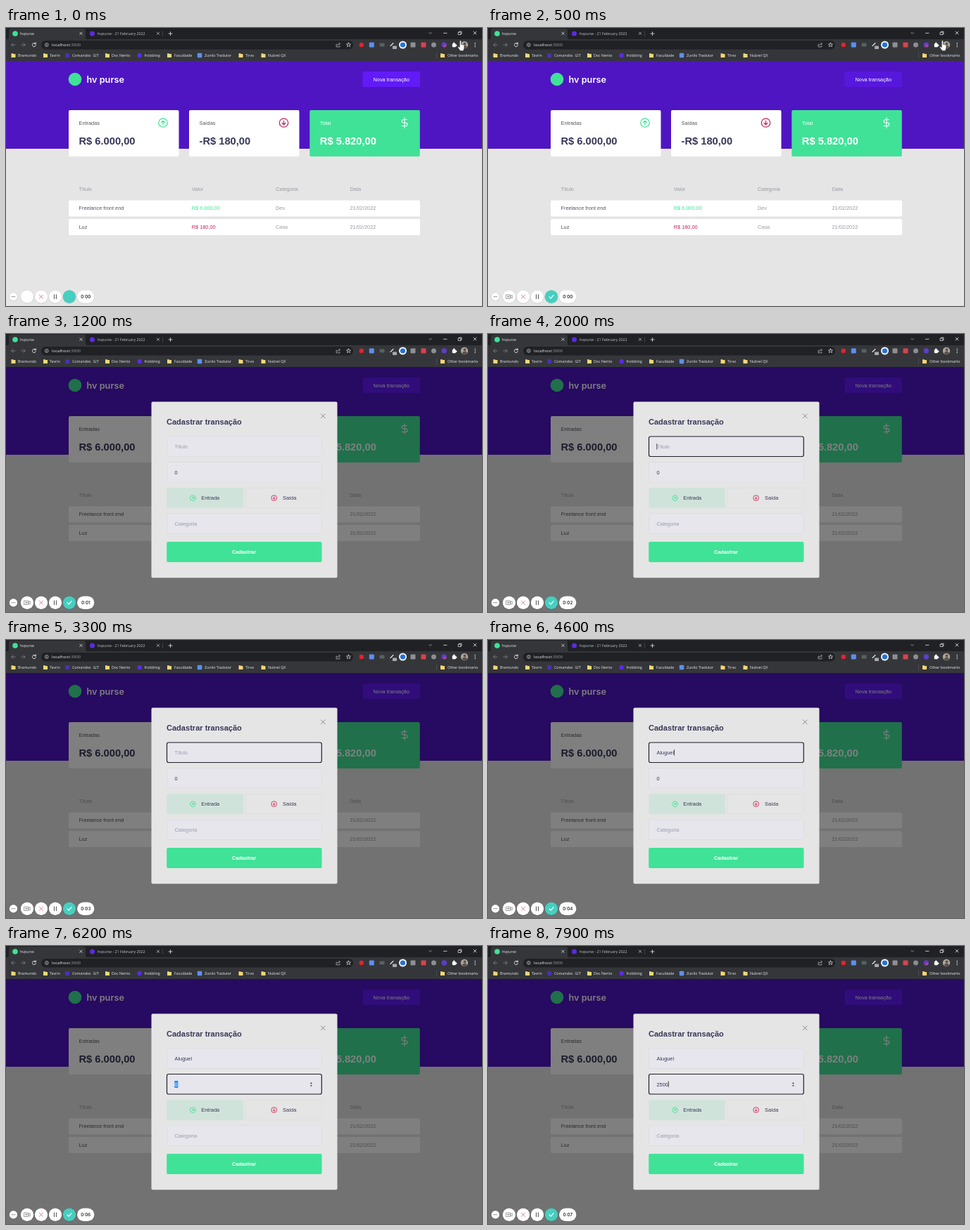
Animation, 676 px wide and 396 px high, one loop 8000 ms. Source, as an HTML page:

```html
<!DOCTYPE html>
<html lang="pt-BR">
<head>
<meta charset="utf-8">
<title>hvpurse</title>
<style>
  html, body { margin: 0; width: 100%; height: 100%; overflow: hidden; background: #e5e5e5; }
  svg { display: block; width: 100%; height: 100%; }
  text { font-family: "Liberation Sans", Arial, sans-serif; white-space: pre; }
  .ui { font-family: "Open Sans", "Noto Sans", sans-serif; }
  .brand { font-family: Inter, sans-serif; font-weight: 600; }
  .bold { font-weight: 700; }
  .mid { text-anchor: middle; }
</style>
</head>
<body>
<svg id="stage" viewBox="0 0 676 396"></svg>
<script>
const LOOP = 8000;
const BODY = 7.36;
const C = {
  purple: '#4f15c3', green: '#40e297', red: '#c9225c', ink: '#38385a', text: '#55555f',
  muted: '#9a9aa2', page: '#e5e5e5', field: '#e6e6ec', line: '#d9d9df',
  strip: '#202124', bar: '#35363a', light: '#e8eaed', folder: '#f8d775'
};

// Drawing helpers: each returns SVG markup.
const rect = (x, y, w, h, fill, r = 0, extra = '') =>
  `<rect x="${x}" y="${y}" width="${w}" height="${h}" rx="${r}" fill="${fill}" ${extra}/>`;
const disc = (x, y, r, fill, extra = '') =>
  `<circle cx="${x}" cy="${y}" r="${r}" fill="${fill}" ${extra}/>`;
const line = (d, stroke, width = 1, extra = '') =>
  `<path d="${d}" fill="none" stroke="${stroke}" stroke-width="${width}" stroke-linecap="round" stroke-linejoin="round" ${extra}/>`;
const label = (x, cy, str, fill, size = BODY, cls = '', extra = '') =>
  `<text x="${x}" y="${(cy + size * .36).toFixed(2)}" font-size="${size}" fill="${fill}" class="${cls}" ${extra}>${str}</text>`;
const ui = (x, cy, str, fill = C.light, size = 5.3) => label(x, cy, str, fill, size, 'ui');
const group = (id, inner) => `<g id="${id}">${inner}</g>`;
const cross = (x, y, r, color, w) =>
  line(`M${x - r} ${y - r}l${2 * r} ${2 * r}m0 ${-2 * r}l${-2 * r} ${2 * r}`, color, w);
const arrowIcon = (x, y, r, color, angle, w) =>
  `<g transform="translate(${x} ${y}) rotate(${angle}) scale(${r})">` +
  disc(0, 0, 1, 'none', `stroke="${color}" stroke-width="${w}"`) +
  line('M0 .45V-.45M-.4 -.05L0 -.45L.4 -.05', color, w) + '</g>';

function browser() {
  let s = rect(0, 0, 676, 47, C.strip) + rect(0, 16, 676, 31, C.bar) +
    `<path d="M2 16q2 0 2-2V4q0-3 3-3H110q3 0 3 3V14q0 2 2 2z" fill="${C.bar}"/>`;
  s += disc(13, 8, 3.8, C.green) + ui(20, 7.6, 'hvpurse') + cross(106.5, 7.7, 1.7, C.light, .8);
  s += disc(122.5, 8, 3.5, '#5b2be0') + ui(130, 7.6, 'hvpurse - 21 February 2022', '#c3c6ca') +
    cross(216, 7.7, 1.7, '#c3c6ca', .8) + line('M222.5 4.5v7', '#55575b', .6);
  s += line('M231 8h5M233.500 5.500v5', C.light, .8);
  s += line('M600.700 6.400l1.900 1.900l1.900-1.900', '#bbb', .7) + line('M621.500 7.300h4.500', C.light, .8) +
    line('M642.500 6h3.500v3.500h-3.500zM643.500 6v-1h3.500v3.500h-1', C.light, .7) + cross(666, 7, 2, C.light, .8);

  s += line('M13 24H7.800m2.300-2.400L7.800 24l2.300 2.400', '#85878b', .8) +
    line('M22 24h5.200m-2.300-2.400l2.300 2.400l-2.300 2.400', '#85878b', .8) +
    line('M42 22.300a2.600 2.600 0 1 0 .5 2.400M42.300 20.800v2h-2', C.light, .9);
  s += rect(50, 18, 443, 12.5, C.strip, 6.2) +
    disc(57.800, 24, 2.400, 'none', `stroke="${C.light}" stroke-width=".6"`) + line('M57.800 24v1.200M57.800 22.800v.1', C.light, .7) +
    label(65, 24, 'localhost<tspan fill="#9aa0a6">:3000</tspan>', C.light, 6.1, 'ui');
  s += line('M470 23.200h-1v3.700h5v-1.500M470.600 25c.3-2 1.500-2.400 3.500-2.400m-1.200-1.400l1.500 1.400l-1.500 1.400', '#bbb', .7) +
    line('M486.500 21l.9 2h2.100l-1.600 1.400l.6 2.200l-2-1.200l-2 1.200l.6-2.200l-1.600-1.400h2.100z', C.light, .7);

  s += disc(504.800, 24, 3.200, '#e3232f') + rect(515.800, 20.500, 7, 7, '#5d8ff0', 1) +
    rect(530.500, 21.500, 7, 5, '#55635f', 1) + line('M546 25.500l4-4', C.light, 1.100) + rect(549, 25.500, 6, 4.500, '#a9abad', .7) +
    disc(563.500, 24, 5.500, '#f4f6f8') + disc(563.500, 24, 3.600, '#2473d4') +
    rect(574.500, 20.500, 7, 7, '#8d8f91', 1) + rect(589.500, 20.500, 7, 7, '#d8434b', 1) +
    disc(607.500, 24, 3.500, '#8c8d90') + disc(622.300, 24, 3.700, '#5b3fc9');
  s += group('recording', disc(623.200, 25.500, 1.800, '#d0406a'));
  s += rect(633.800, 22.200, 5, 5, '#fff', .6) + disc(636.300, 21.800, 1.200, '#fff') + disc(639.200, 24.700, 1.200, '#fff');
  s += disc(651, 24, 5.200, '#aaa59a') + disc(651.500, 22.500, 1.900, '#5c5149') +
    `<path d="M647.800 28.100q.3-3.400 3.700-3.400t3.200 3q-3 2.600-6.900.4z" fill="#5c5149"/>`;
  s += [21.500, 24, 26.500].map(y => disc(666.200, y, .75, C.light)).join('');

  const folder = x => `<path d="M${x} 36.200h2.500l.8 .8h2.700v4.900h-6z" fill="${C.folder}"/>`;
  s += [7.500, 53, 141, 229, 330.500, 362.500, 617].map(folder).join('');
  s += rect(84.200, 36.200, 5.800, 5.800, '#4a31b5') + disc(189.700, 39, 3.200, '#5a2de0') + rect(271.800, 35.800, 6.500, 6.500, '#5d8ff0', 1);
  s += [[17, 'Bramundo'], [62, 'Tavrin'], [94, 'Comandos  GIT'], [150, 'Doc Nerito'], [196.500, 'frobbling'],
    [239, 'Faculdade'], [282, 'Zunilo Tradutor'], [340, 'Tirvo'], [372, 'Nubrel QX'], [627, 'Other bookmarks']]
    .map(([x, str]) => ui(x, 38.800, str)).join('');
  return s + line('M611.500 35v8', '#5a5c60', .6);
}

function card(x, title, amount, icon, fill, ink, titleInk) {
  return rect(x, 117, 156.500, 66, fill, 2) + label(x + 14.500, 135, title, titleInk) +
    label(x + 14.500, 161, amount, ink, 14.7, 'bold') + icon;
}

function page() {
  let s = rect(0, 47, 676, 349, C.page) + rect(0, 47, 676, 125, C.purple);
  s += disc(98, 73, 9.300, C.green) + label(114.500, 73, 'hv purse', '#fff', 12.7, 'brand');
  s += rect(506.500, 62, 81.500, 22, '#611bf6', 2, 'id="newButton"') + label(547.300, 73, 'Nova transação', '#fff', BODY, 'mid');
  const dollar = `<g transform="translate(558.200 127.200) scale(.65)">` +
    line('M12 1v22M17 5H9.500a3.500 3.500 0 0 0 0 7h5a3.500 3.500 0 0 1 0 7H6', '#fff', 1.7) + '</g>';
  s += card(89, 'Entradas', 'R$ 6.000,00', arrowIcon(223, 135, 6.2, C.green, 0, .2), '#fff', C.ink, C.text) +
    card(260, 'Saídas', '-R$ 180,00', arrowIcon(394.500, 135, 6.2, C.red, 180, .2), '#fff', C.ink, C.text) +
    card(431.300, 'Total', 'R$ 5.820,00', dollar, C.green, '#fff', '#fff');
  const row = (y, cells, colors) =>
    [103.500, 263.700, 383, 488.500].map((x, i) => label(x, y, cells[i], colors[i])).join('');
  const { muted, text, green, red } = C;
  return s + row(229, ['Título', 'Valor', 'Categoria', 'Data'], Array(4).fill(muted)) +
    rect(89, 245.500, 499, 23, '#fff', 2) + rect(89, 272, 499, 23, '#fff', 2) +
    row(256.700, ['Freelance front end', 'R$ 6.000,00', 'Dev', '21/02/2022'], [text, green, muted, muted]) +
    row(283.300, ['Luz', 'R$ 180,00', 'Casa', '21/02/2022'], [text, red, muted, muted]);
}

function modal() {
  const box = (x, y, w, fill, stroke = C.line) => rect(x, y, w, 28.500, fill, 2, `stroke="${stroke}" stroke-width=".6"`);
  return rect(0, 47, 676, 349, '#000', 0, 'opacity=".5"') + rect(206.500, 96.500, 264, 250.800, C.page, 2) +
    label(228, 124.800, 'Cadastrar transação', C.ink, 11.06, 'bold') +
    group('close', cross(450.300, 116.800, 2.900, '#8b8b90', 1)) +
    box(228.500, 146, 219.800, C.field) + box(228.500, 182.500, 219.800, C.field) + box(228.500, 256, 219.800, C.field) +
    rect(228.200, 219, 109, 29.300, '#d0e3da', 2) + box(340, 219.300, 108.300, C.page) +
    arrowIcon(265.500, 233.600, 3.900, C.green, 45, .22) + label(277.300, 233.600, 'Entrada', C.ink) +
    arrowIcon(380.700, 233.600, 3.900, C.red, 180, .22) + label(393, 233.600, 'Saída', C.ink) +
    label(239.500, 270.300, 'Categoria', '#9c9cae') +
    rect(228.200, 296, 220.300, 29, C.green, 2) + label(338, 310.500, 'Cadastrar', '#fff', 7.3, 'bold mid') +
    group('spinner', '<path d="M431.800 196.200h3.200l-1.600-2.100zM431.800 198.200h3.200l-1.600 2.100z" fill="#444"/>') +
    rect(239.300, 192, 5, 10, '#2f8cf5', 0, 'id="selection"') +
    label(239.500, 160.200, '', C.ink, BODY, '', 'id="titleText"') +
    label(239.500, 196.900, '0', C.ink, BODY, '', 'id="valueText"') +
    rect(228.500, 146, 219.800, 28.500, 'none', 2.500, 'id="focus" stroke="#20202a" stroke-width="1.2"') +
    rect(239.500, 0, .7, 8.600, '#111', 0, 'id="caret"');
}

function recorder() {
  const button = (x, r, fill = '#fff') => disc(x, 383, r + .5, '#000', 'opacity=".12"') + disc(x, 382.700, r, fill);
  return button(10.500, 5.700) + [8.600, 10.500, 12.400].map(x => disc(x, 382.700, .6, '#555')).join('') +
    button(30, 9.200) + button(50, 9.200) + button(70, 9.200) + button(90, 9.200, '#45cfc0') +
    cross(50, 382.700, 2.600, '#e0708a', .9) + line('M68.500 379.800v5.800M71.500 379.800v5.800', '#666', 1.200) +
    group('icons', line('M26 380h5.500v5.500H26zM31.500 382l2.700-1.500v4.500l-2.700-1.500M27.500 382.700h2.500M28.700 381.500v2.500', '#777', .7) +
      line('M87 382.900l2.100 2.100l4-4.300', '#fff', 1.200)) +
    rect(100.700, 373.600, 25, 19, '#000', 9.500, 'opacity=".12"') + rect(101, 373.500, 24.400, 18.400, '#fff', 9.200) +
    label(113.300, 382.700, '0:00', '#333', 6.2, 'brand mid', 'id="timer"');
}

const hand = group('hand',
  '<path d="M644.300 19.200q0-1.400 1.100-1.400t1.100 1.400v4.200l3 .7q1.700.4 1.500 2l-.6 4-1 2.400h-4.200l-3.400-4.600q-.5-1.200.7-1.400l1.800 1z" fill="#fff" stroke="#333" stroke-width=".6"/>');

document.getElementById('stage').innerHTML =
  page() + group('modal', modal()) + recorder() + browser() + hand;

const el = {};
for (const node of document.querySelectorAll('[id]')) el[node.id] = node;

const TITLE = [[1800, ''], [3600, 'A'], [3800, 'Al'], [4000, 'Alu'], [4200, 'Alug'], [4300, 'Alugu'], [4500, 'Alugue'], [4600, 'Aluguel']];
const VALUE = [[0, '0'], [6400, '2'], [7200, '25'], [7400, '250'], [7600, '2500']];
const RED_DOT = [[0, 900], [2400, 2800], [3300, 3700], [4800, 5100], [5700, 5900], [6600, 6800], [7200, 8000]];
const T = { icons: 100, hover: 100, open: 600, close: 700, leave: 900, focusTitle: 1800, focusValue: 5100, typeValue: 6400 };

const stepAt = (steps, t) => steps.reduce((now, step) => step[0] <= t ? step : now, steps[0]);
const show = (node, on) => node.setAttribute('visibility', on ? 'inherit' : 'hidden');
const clamp = v => Math.min(1, Math.max(0, v));

function render(t) {
  const onValue = t >= T.focusValue;
  const selecting = onValue && t < T.typeValue;
  const title = stepAt(TITLE, t), value = stepAt(VALUE, t);

  show(el.icons, t >= T.icons);
  show(el.modal, t >= T.open);
  show(el.close, t >= T.close);
  show(el.hand, t < T.leave);
  show(el.recording, RED_DOT.some(([from, to]) => t >= from && t < to));
  const shade = t < T.leave ? 1 - .1 * clamp((t - T.hover) / 200) : 1;
  el.newButton.style.filter = `brightness(${shade})`;

  el.titleText.textContent = title[1] || 'Título';
  el.titleText.setAttribute('fill', title[1] ? C.ink : '#9c9cae');
  el.valueText.textContent = value[1];
  el.valueText.setAttribute('fill', selecting ? '#fff' : C.ink);

  show(el.focus, t >= T.focusTitle);
  el.focus.setAttribute('y', onValue ? 182.5 : 146);
  show(el.spinner, onValue);
  show(el.selection, selecting);

  const [since, typed] = onValue ? value : title;
  const field = onValue ? el.valueText : el.titleText;
  el.caret.setAttribute('x', 239.5 + (typed ? field.getComputedTextLength() : 0));
  el.caret.setAttribute('y', onValue ? 192.5 : 156);
  show(el.caret, t >= T.focusTitle && !selecting && (t - since) % 1000 < 500);

  el.timer.textContent = '0:0' + Math.floor(t / 1000);
}

const start = performance.now();
function tick() {
  render((performance.now() - start) % LOOP);
  requestAnimationFrame(tick);
}
tick();
</script>
</body>
</html>
```
